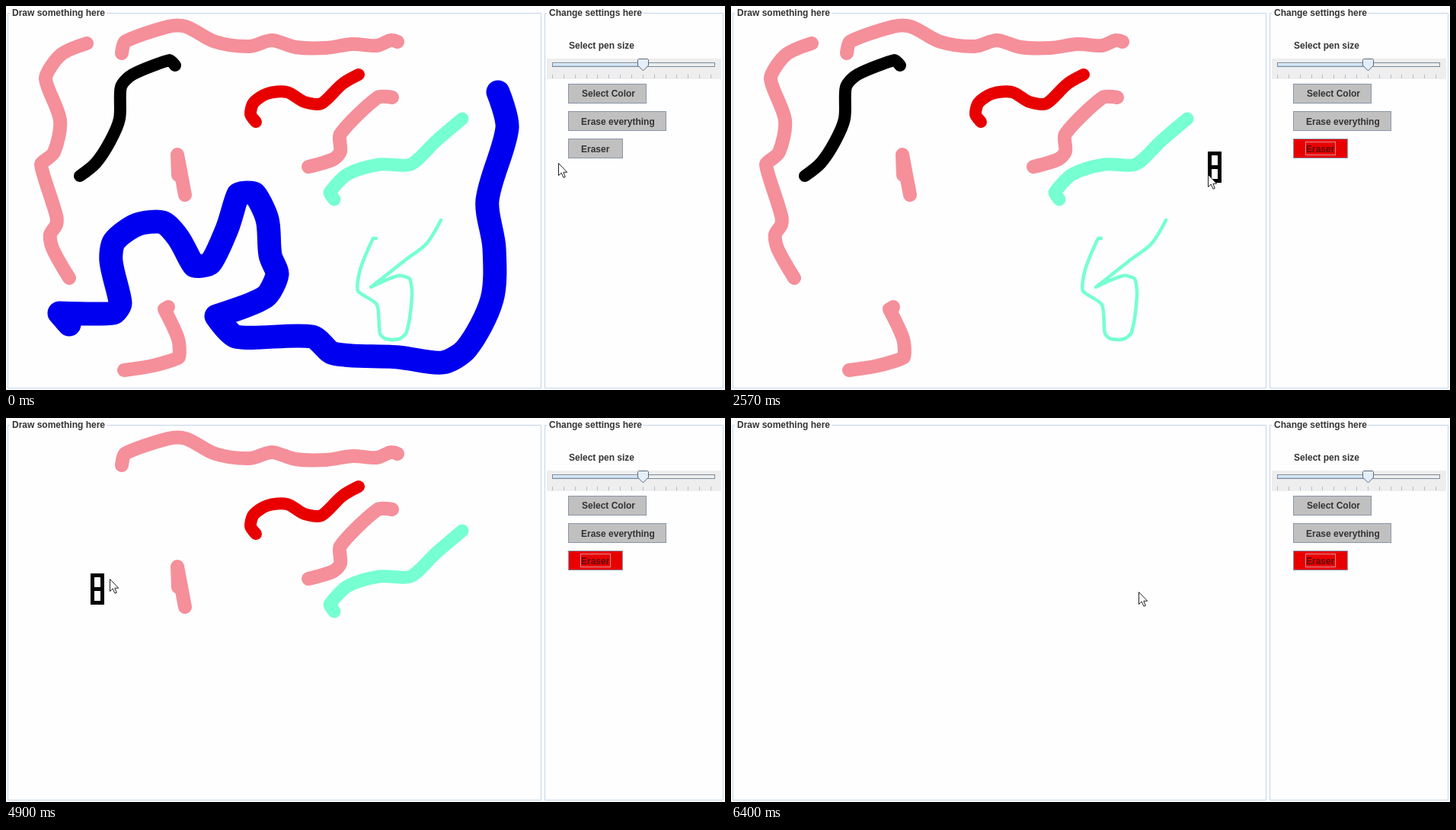
Recreate the animation shown at these times as an HTML page. Size 944 by 504 pixels, loop 6.43 s.

```html
<!DOCTYPE html>
<html lang="en">
<head>
<meta charset="utf-8">
<title>Drawing pad</title>
<style>
  html, body { margin: 0; height: 100%; overflow: hidden; background: #fefefe; }
  svg { display: block; }
  text { font: bold 12px "Liberation Sans", Arial, sans-serif; fill: #333; }
  .panel { fill: none; stroke: #c4d6ea; }
  .button { fill: #c0c0c0; stroke: #8a96a8; }
  .stroke { fill: none; stroke-linecap: round; stroke-linejoin: round; }
</style>
</head>
<body>
<svg width="944" height="504" viewBox="0 0 944 504">
  <defs>
    <linearGradient id="fill" x2="0" y2="1">
      <stop offset="0" stop-color="#f0f6fe"/>
      <stop offset="1" stop-color="#b4cfec"/>
    </linearGradient>
  </defs>
  <rect width="944" height="504" fill="#fefefe"/>
  <path class="panel" d="M5 9.5H2.5V501.5H702.5V9.5H132M710 9.5H707.5V501.5H941.5V9.5H836"/>
  <text x="8" y="13">Draw something here</text>
  <text x="713" y="13">Change settings here</text>
  <text x="739" y="56">Select pen size</text>

  <rect x="710" y="69" width="229" height="27" fill="#eee"/>
  <rect x="717.5" y="74.5" width="213" height="5" fill="#eee" stroke="#7a8a99"/>
  <rect x="718" y="75" width="112" height="4" fill="url(#fill)"/>
  <path id="ticks" stroke="#b0bccb"/>
  <path d="M829.5 70.5L830.5 69.5H842.5L843.5 70.5V78L836.5 85L829.5 78Z" fill="#e4eefa" stroke="#5c6a78"/>

  <rect class="button" x="738.5" y="102.5" width="102" height="25"/>
  <text x="756" y="119">Select Color</text>
  <rect class="button" x="738.5" y="138.5" width="128" height="25"/>
  <text x="755" y="156">Erase everything</text>
  <rect class="button" id="eraser" x="738.5" y="174.5" width="71" height="25"/>
  <text id="label" x="755" y="192">Eraser</text>
  <rect id="focus" x="754.5" y="178.5" width="39" height="17" fill="none" stroke="#e08c96"/>

  <g id="strokes"></g>
  <path id="block" d="M-6.5 -18H6.5V18H-6.5ZM-6.5 0H6.5" fill="none" stroke="#000" stroke-width="5"/>
  <path id="cursor" d="M.5 .5V16.5L4.2 13L7 19.2L9.3 18.2L6.8 12.2H11.7Z" fill="#fefefe" stroke="#222"/>
</svg>
<script>
const LOOP = 6430, PRESS = 950, DRAG = [1550, 6250], LAG = 60;
const $ = id => document.getElementById(id);
const PINK = '#f58f9a', MINT = '#76ffd0';
const parse = s => s.split(' ').map(p => p.split(',').map(Number));

// smooth curve through the points; turns of 90 degrees or more stay sharp
function curve(points) {
  const handle = (i, sign, length) => {
    const p = points[i], a = points[i - 1], b = points[i + 1];
    if (!a || !b) return p;
    const dot = (p[0] - a[0]) * (b[0] - p[0]) + (p[1] - a[1]) * (b[1] - p[1]);
    const cos = dot / Math.hypot(p[0] - a[0], p[1] - a[1]) / Math.hypot(b[0] - p[0], b[1] - p[1]);
    const k = sign * length * .33 * Math.max(0, cos) / Math.hypot(b[0] - a[0], b[1] - a[1]);
    return [p[0] + (b[0] - a[0]) * k, p[1] + (b[1] - a[1]) * k];
  };
  return 'M' + points[0] + points.slice(1).map((p, i) => {
    const length = Math.hypot(p[0] - points[i][0], p[1] - points[i][1]);
    return `C${handle(i, 1, length)} ${handle(i + 1, -1, length)} ${p}`;
  }).join('');
}

function stroke(color, width, end, points) {
  const el = document.createElementNS('http://www.w3.org/2000/svg', 'path');
  const attrs = { class: 'stroke', stroke: color, 'stroke-width': width, d: curve(parse(points)) };
  for (const name in attrs) el.setAttribute(name, attrs[name]);
  $('strokes').append(el);
  return { el, end };
}

// colour, width, time of erasure, key points
const strokes = [
  stroke(PINK, 18, 5680, '152,62 156,47 213,27 236,27 275,47 320,53 349,45 380,54 420,55 455,50 487,52 505,45 514,47'),
  stroke(PINK, 18, 4430, '106,49 72,64 52,95 71,150 63,192 46,208 66,275 66,287 58,300 61,318 83,357'),
  stroke('#000', 16, 4780, '97,223 118,206 137,177 149,148 151,106 166,90 215,71 222,78'),
  stroke('#e80000', 16, 5370, '328,152 321,142 325,127 343,115 369,113 392,126 414,128 442,102 463,90'),
  stroke(PINK, 18, 5920, '507,120 488,120 439,168 439,191 430,201 397,211'),
  stroke(MINT, 17, 6130, '431,254 425,245 448,221 490,208 531,208 566,176 599,148'),
  stroke(PINK, 18, 5130, '226,222 225,195 235,248'),
  stroke(PINK, 18, 3720, '213,395 208,398 226,437 227,461 193,472 155,478'),
  stroke(MINT, 4.5, 3000, '486,305 482,305 465,346 462,374 487,392 491,430 499,437 516,437 526,428 533,380 530,358 515,354 479,369 526,332 552,312 571,281'),
  stroke('#0000f0', 31, 2030, '83,418 70,403 141,403 150,390 138,335 142,309 172,287 206,284 226,304 247,341 268,338 290,293 305,247 326,246 343,280 347,327 356,352 340,382 276,407 302,434 402,434 430,456 515,461 573,468 605,449 638,385 641,318 632,255 658,160 646,113')
];

// pointer path: time, x, y
const path = parse('0,725,206 800,770,189 1150,770,189 1610,664,153 1670,665,151 2100,650,158 ' +
  '2510,631,203 2570,626,221 3000,562,284 3370,432,355 3430,403,382 3720,240,455 ' +
  '4310,89,310 4370,77,308 4780,95,222 5130,215,190 5340,325,147 5400,328,148 ' +
  '5680,352,55 5920,455,140 6250,535,228 6430,535,228');

function pointer(t) {
  const i = Math.max(1, path.findIndex(p => p[0] >= t));
  const [a, b] = [path[i - 1], path[i]];
  const k = Math.max(0, (t - a[0]) / (b[0] - a[0]));
  return [1, 2].map(n => Math.round(a[n] + (b[n] - a[n]) * k));
}

const show = (el, on) => { el.style.display = on ? '' : 'none'; };
const place = (el, x, y) => el.setAttribute('transform', `translate(${x} ${y})`);

function draw(now) {
  const t = now % LOOP, pressed = t >= PRESS;
  strokes.forEach(s => show(s.el, t < s.end));
  $('eraser').style.fill = pressed ? '#e80000' : '';
  $('label').style.fill = pressed ? '#5a0c0c' : '';
  show($('focus'), pressed);

  // the eraser block trails the pointer slightly
  const [x, y] = pointer(t - LAG);
  place($('block'), x + 4, y + 8.5);
  show($('block'), t >= DRAG[0] && t < DRAG[1]);
  place($('cursor'), ...pointer(t));
  requestAnimationFrame(draw);
}

$('ticks').setAttribute('d', Array.from({ length: 15 }, (_, i) =>
  `M${Math.round(717 + i * 14.86) + .5} 90v5`).join(''));
requestAnimationFrame(draw);
</script>
</body>
</html>
```
